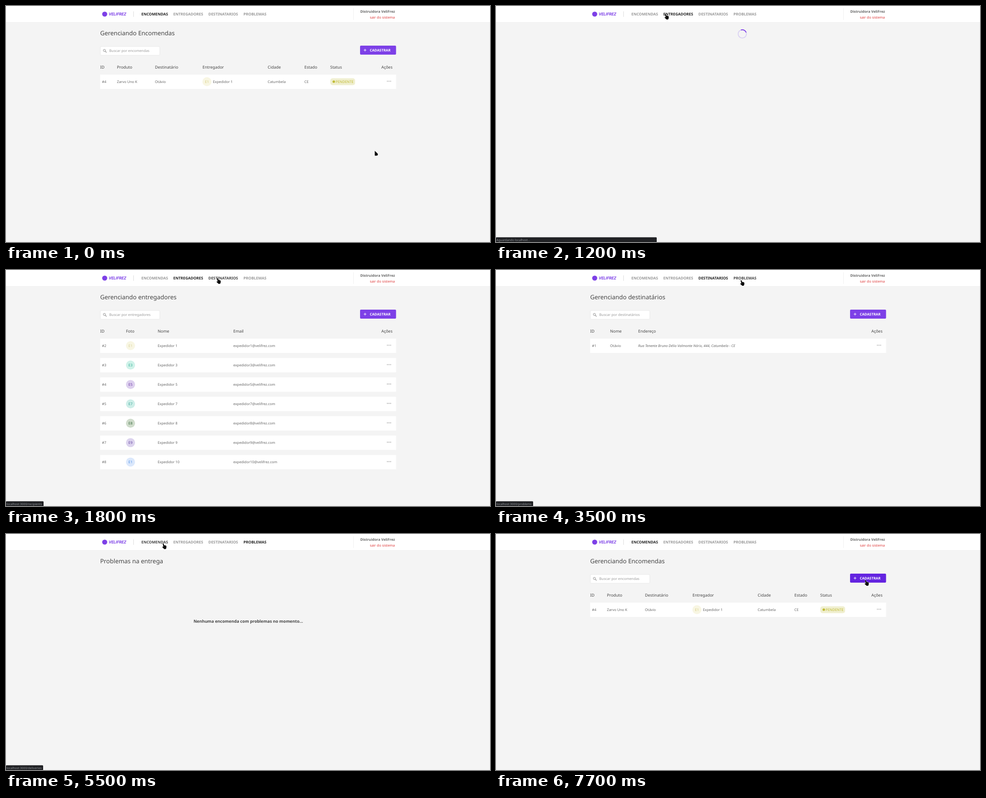
Write an HTML page that moves like this. It is 1069x524 px and loops after 8 s.

```html
<!DOCTYPE html>
<html lang="pt-BR">
<head>
<meta charset="utf-8">
<title>Painel de entregas</title>
<style>
  html, body { margin: 0; width: 100%; height: 100%; overflow: hidden; background: #f4f4f4; }
  svg { display: block; width: 1069px; height: 524px; font-family: "Noto Sans", sans-serif; text-rendering: geometricPrecision; }
  text { font-size: 7.8px; fill: #666; white-space: pre; }
  .b { font-weight: 700; }
  .i { font-style: italic; }
  .nav { font-size: 8.35px; font-weight: 700; fill: #999; }
  .hover { fill: #444; }
  .active { fill: #222; }
  .logo { font: italic 700 9px Roboto, sans-serif; fill: #7d40e7; }
  .title { font-size: 13.4px; fill: #444; }
  .head { font-size: 8.91px; fill: #444; }
  .empty { font-size: 9.12px; font-weight: 700; fill: #444; }
  .hint { fill: #999; }
  .status { font-size: 6.68px; fill: #92969b; }
</style>
</head>
<body>
<svg id="stage" viewBox="0 0 1069 524"></svg>
<script>
const LOOP = 8000, PURPLE = '#7d40e7';
const stage = document.getElementById('stage');

const text = (x, y, s, cls = '', extra = '') => `<text x="${x}" y="${y}" class="${cls}" ${extra}>${s}</text>`;
const rect = (x, y, w, h, fill, extra = '') =>
  `<rect x="${x}" y="${y}" width="${w}" height="${h}" fill="${fill}" ${extra}/>`;
const circle = (x, y, r, fill, extra = '') => `<circle cx="${x}" cy="${y}" r="${r}" fill="${fill}" ${extra}/>`;
const path = (d, extra) => `<path d="${d}" ${extra}/>`;

const navItems = [[299, 'ENCOMENDAS'], [369.5, 'ENTREGADORES'], [447, 'DESTINATARIOS'], [524.5, 'PROBLEMAS']];

function header(active, hover) {
  return rect(0, 0, 1069, 36, '#fff') + rect(0, 36, 1069, .5, '#e9e9e9')
    + circle(218, 18, 5.6, PURPLE) + text(227, 21.2, 'VELIFREZ', 'logo')
    + rect(281.4, 12, .7, 12, '#ccc') + rect(767, 5, .7, 26, '#e8e8e8')
    + navItems.map(([x, s], i) =>
        text(x, 21.2, s, 'nav ' + (i === active ? 'active' : i === hover ? 'hover' : ''))).join('')
    + text(859, 14.5, 'Distruidora VeliFrez', 'b', 'text-anchor="end"')
    + text(859, 28, 'sair do sistema', '', 'text-anchor="end" style="fill:#de3b3b"');
}

function toolbar(title, hint, pressed) {
  return text(208, 65.4, title, 'title')
    + rect(208.3, 90, 131.4, 19.3, '#fff', 'rx="2" stroke="#ddd" stroke-width=".6"')
    + circle(217.3, 98.6, 2.4, 'none', 'stroke="#888" stroke-width="1"')
    + path('M219.1 100.4L222 103.2', 'stroke="#888" stroke-width="1.2"')
    + text(228, 102.3, 'Buscar por ' + hint, 'hint')
    + rect(782, 88, 79.5, 20, pressed ? '#6424e0' : PURPLE, 'rx="2"')
    + path('M790 98h6M793 95v6', 'stroke="#fff" stroke-width="1"')
    + text(803.5, 101, 'CADASTRAR', 'b', 'style="fill:#fff"');
}

const heads = cols => [...cols, [829, 'Ações']].map(([x, s]) => text(x, 138.7, s, 'head')).join('');

function row(n, id, cells) {
  const dots = [842.4, 845.9, 849.4].map(x => circle(x, 167, 1.35, '#c6c6c6')).join('');
  return `<g transform="translate(0 ${n * 43.07})">` + rect(208, 152.3, 653.5, 31.8, '#fff')
    + text(212, 171, '#' + id) + cells + dots + '</g>';
}

const avatar = (x, s, bg, fg) => circle(x, 168, 10, bg)
  + text(x, 171, s, '', `text-anchor="middle" style="fill:${fg}"`);

const couriers = [
  [1, '#f8f6e3', '#d9d29a'], [3, '#cff2e9', '#2cab92'], [5, '#ddd0ee', '#6834a6'], [7, '#cdeee8', '#35a396'],
  [8, '#cfdccb', '#33673a'], [9, '#dcd3ee', '#6142a0'], [10, '#dbe8fc', '#4f93e6']];

const pages = {
  orders: pressed => toolbar('Gerenciando Encomendas', 'encomendas', pressed)
    + heads([[208, 'ID'], [245, 'Produto'], [329, 'Destinatário'], [434, 'Entregador'],
             [578, 'Cidade'], [659, 'Estado'], [716, 'Status']])
    + row(0, 4, text(245, 171, 'Zarvo Uno K') + text(329, 171, 'Otávio')
      + avatar(443.8, 'E1', '#f8f6e3', '#d6cd80') + text(457, 171, 'Expedidor 1')
      + text(578, 171, 'Catumbela') + text(659, 171, 'CE')
      + rect(716.3, 160.5, 54.8, 15.2, '#f0efd0', 'rx="5"')
      + circle(724, 168, 2.8, '#c1bc35') + text(728, 171, 'PENDENTE', '', 'style="fill:#c1bc35"')),

  couriers: () => toolbar('Gerenciando entregadores', 'entregadores')
    + heads([[208, 'ID'], [265, 'Foto'], [335, 'Nome'], [502, 'Email']])
    + couriers.map(([n, bg, fg], i) => row(i, i + 2,
        avatar(275, 'E' + String(n)[0], bg, fg) + text(335, 171, 'Expedidor ' + n)
        + text(502, 171, `expedidor${n}@velifrez.com`))).join(''),

  recipients: () => toolbar('Gerenciando destinatários', 'destinatários')
    + heads([[208, 'ID'], [252, 'Nome'], [314, 'Endereço']])
    + row(0, 1, text(252, 171, 'Otávio')
      + text(314, 171, 'Rua Tenente Bruno Délio Valmonte Nórix, 444, Catumbela - CE', 'i')),

  problems: () => text(208, 65.4, 'Problemas na entrega', 'title')
    + text(535, 197.3, 'Nenhuma encomenda com problemas no momento...', 'empty', 'text-anchor="middle"'),

  loading: (_, time) => circle(544, 62, 9.2, 'none', 'stroke="#d9d0f3" stroke-width="1.8"')
    + path('M544 52.8A9.2 9.2 0 0 1 553.2 62', `fill="none" stroke="${PURPLE}" stroke-width="1.8"
        transform="rotate(${(time - 1200) * .36 - 20} 544 62)"`)
};
const tabs = { orders: 0, couriers: 1, loading: 1, recipients: 2, problems: 3 };

const cursors = {
  arrow: 'M0 0L6.6 6.6Q7.3 9.8 5.6 10.4L1.6 11Q0 11.2 0 9.4Z',
  hand: 'M1.2 1.3Q2.2-.4 3.3 1.1L4.6 4.4 8 5Q9.8 5.6 9.6 8L9.2 11Q8.8 13 7 13H4.8L1 9.6Q-.2 8 1.2 7.6L2.8 8Z'
};
const cursor = (kind, x, y) => path(cursors[kind],
  `transform="translate(${x} ${y})" fill="#0b0b0b" stroke="#fff" stroke-width=".7" paint-order="stroke"`);

const barWidths = { deliverymen: 91, recipients: 83, problems: 82, deliveries: 82 };
function statusBar(route, wide, opacity = 1) {
  if (!route) return '';
  const label = route === 'wait' ? 'Aguardando localhost...' : 'localhost:3000/' + route;
  return rect(0, 513.5, wide ? 355 : barWidths[route], 11, '#202124', `rx="1.5" opacity="${opacity}"`)
    + text(1, 521.7, label, 'status');
}

// time, page, cursor, x, y, hovered tab, status route, wide bar, bar opacity
const steps = [
  [0, 'orders', 'arrow', 814.5, 321.5],
  [200, 'orders', 'arrow', 760, 255],
  [300, 'orders', 'arrow', 610, 150],
  [400, 'orders', 'arrow', 440, 60],
  [500, 'orders', 'hand', 347, 20],
  [600, 'orders', 'hand', 370, 19, 1],
  [800, 'orders', 'hand', 372, 17.5, 1, 'deliverymen'],
  [900, 'orders', 'hand', 372, 17, 1, 'deliverymen'],
  [1200, 'loading', 'hand', 372, 17, 1, 'wait', true],
  [1300, 'loading', 'hand', 372, 17, 1, 'wait', true],
  [1400, 'loading', 'hand', 372, 17, 1, 'wait', true],
  [1500, 'couriers', 'hand', 376, 17, 1, 'deliverymen', true],
  [1600, 'couriers', 'hand', 405, 17, 1, 'deliverymen', true],
  [1700, 'couriers', 'hand', 450, 17.5, 2, 'deliverymen', true, .77],
  [1800, 'couriers', 'hand', 464.7, 17.7, 2, 'recipients'],
  [3500, 'recipients', 'hand', 539, 22, 3, 'problems'],
  [3900, 'recipients', 'hand', 539, 20.7, 3, 'problems'],
  [4500, 'problems', 'hand', 508.5, 20, 2, 'problems'],
  [5000, 'problems', 'hand', 415, 20, 1, 'deliverymen'],
  [5500, 'problems', 'hand', 344.8, 20.5, 0, 'deliveries'],
  [6100, 'orders', 'hand', 344.8, 20.5, 0, 'deliveries', true],
  [6600, 'orders', 'arrow', 631.7, 143, -1, 'deliveries', true, .77],
  [7200, 'orders', 'arrow', 814.5, 111],
  [7700, 'orders', 'hand', 813.8, 102]
];

let shown;
function frame(now) {
  const t = now % LOOP;
  const step = steps.findLast(s => s[0] <= t);
  if (step !== shown) {
    shown = step;
    const [time, page, kind, x, y, hover, route, wide, opacity] = step;
    const pressed = kind === 'hand' && y > 88;
    stage.innerHTML = rect(0, 0, 1069, 524, '#f4f4f4') + header(tabs[page], hover)
      + pages[page](pressed, time) + statusBar(route, wide, opacity) + cursor(kind, x, y);
  }
  requestAnimationFrame(frame);
}
frame(0);
</script>
</body>
</html>
```
